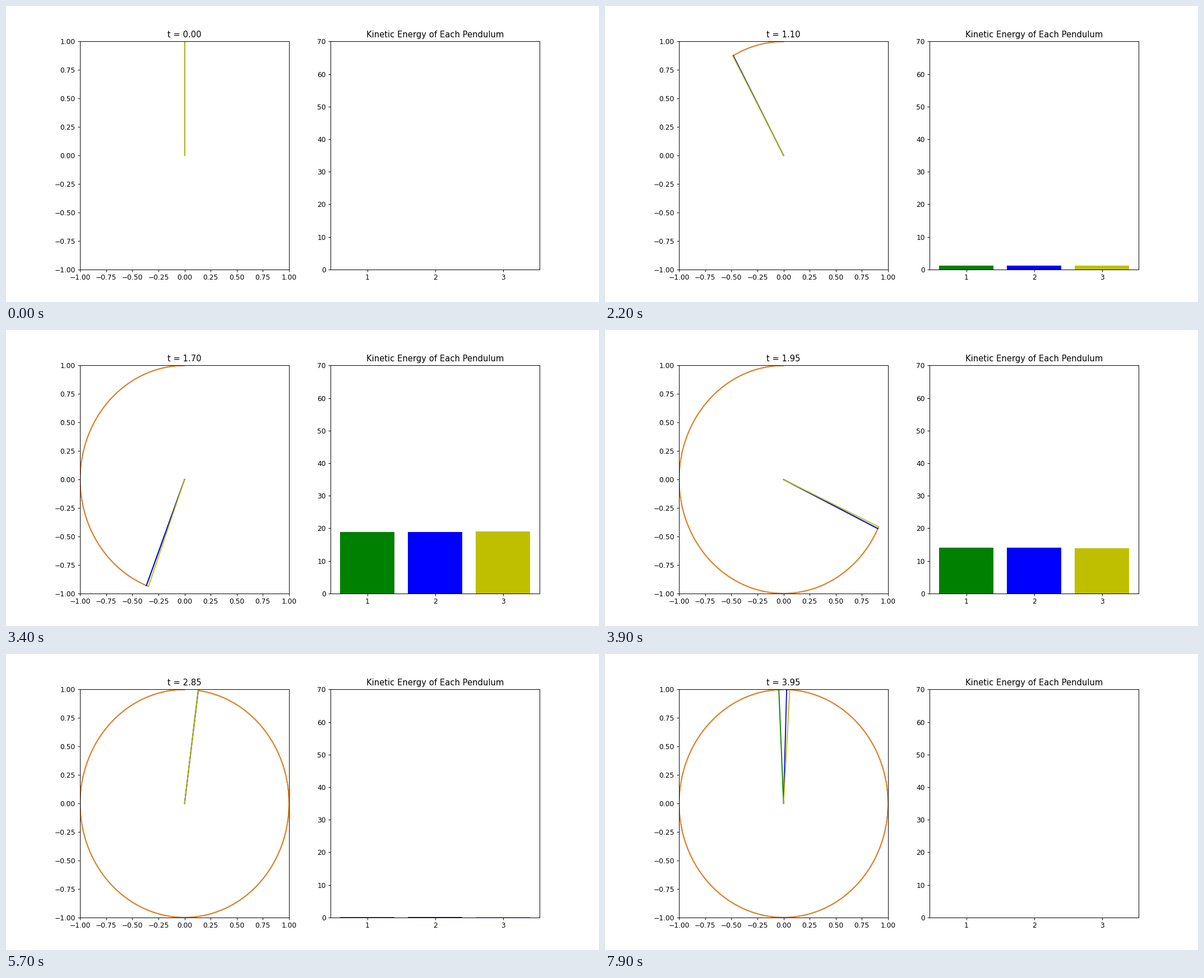
Write a matplotlib script that moves like this. It is 1058x529 px and loops after 8 s.

```python
import numpy as np
import matplotlib.pyplot as plt
from matplotlib.animation import FuncAnimation

G = 9.81
FRAMES = 80
FRAME_DT = 0.05
SUB = 10                      # integration steps per frame
COLORS = ["g", "b", "y"]
SPEED = np.array([0.1011, 0.1011, 0.1022])       # start speed at the top
DRAG = np.array([0.000041, 0.000287, 0.000388])


def slope(state):
    angle, speed = state
    return np.array([speed, G * np.sin(angle) - DRAG * speed])


def simulate():
    """RK4 for all pendulums; angles are measured from the upright position."""
    h = FRAME_DT / SUB
    state = np.array([np.zeros(3), SPEED])
    states = [state]
    for _ in range((FRAMES - 1) * SUB):
        k1 = slope(state)
        k2 = slope(state + h / 2 * k1)
        k3 = slope(state + h / 2 * k2)
        k4 = slope(state + h * k3)
        state = state + h / 6 * (k1 + 2 * k2 + 2 * k3 + k4)
        states.append(state)
    return np.array(states)


states = simulate()
angles, speeds = states[:, 0], states[:, 1]
xs, ys = -np.sin(angles), np.cos(angles)
energy = speeds ** 2 / 2

fig, (left, right) = plt.subplots(1, 2, figsize=(12, 6), dpi=88.1667)

left.set_xlim(-1, 1)
left.set_ylim(-1, 1)
title = left.set_title("")
trails = [left.plot([], [], color=c)[0] for c in ("C0", "C1")]
rods = [left.plot([], [], color=c)[0] for c in COLORS]

bars = right.bar([1, 2, 3], [0, 0, 0], color=COLORS)
right.set_xlim(0.46, 3.54)
right.set_ylim(0, 70)
right.set_xticks([1, 2, 3])
right.set_title("Kinetic Energy of Each Pendulum")


def update(frame):
    i = frame * SUB
    title.set_text(f"t = {frame * FRAME_DT:.2f}")
    for trail, k in zip(trails, (1, 2)):
        trail.set_data(xs[:i + 1, k], ys[:i + 1, k])
    for k, (rod, bar) in enumerate(zip(rods, bars)):
        rod.set_data([0, xs[i, k]], [0, ys[i, k]])
        bar.set_height(energy[i, k])
    return [title, *trails, *rods, *bars]


anim = FuncAnimation(fig, update, frames=FRAMES, interval=100,
                     init_func=lambda: update(0), repeat=True, repeat_delay=0)
plt.show()
```
